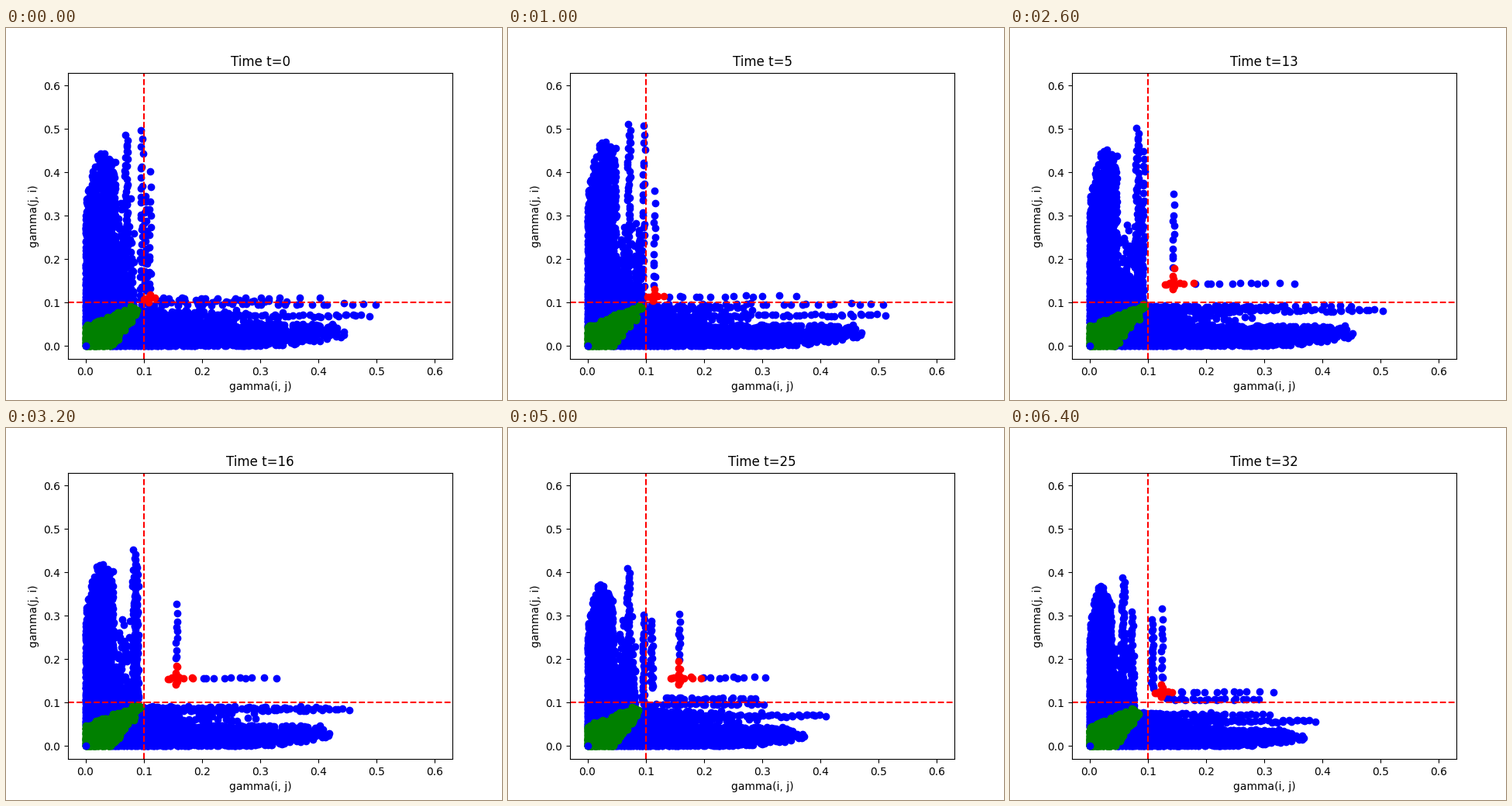
A matplotlib script for the animation above (6600 ms loop, 640x480 px).

```python
import numpy as np
import matplotlib.pyplot as plt
from matplotlib.animation import FuncAnimation

FRAMES, INTERVAL = 33, 200
LIMITS = (-0.03, 0.63)
THRESHOLD = 0.1
rng = np.random.default_rng(7)


def keyed(*keys):
    """Function of time running through (time, value) keys."""
    times, values = zip(*keys)
    return lambda t: np.interp(t, times, values)


class Core:
    """Dense wing of many weak nodes, longest at a mid weak value."""
    reach = staticmethod(keyed((0, 0.462), (5, 0.49), (10, 0.505), (16, 0.436),
                               (20, 0.408), (25, 0.384), (32, 0.38)))
    width = staticmethod(keyed((0, 0.052), (10, 0.047), (20, 0.049), (32, 0.038)))
    peak = staticmethod(keyed((0, 0.034), (16, 0.032), (32, 0.022)))

    def __init__(self, count):
        self.u = rng.beta(1, 1.6, count)
        self.v = rng.random(count) ** 1.2

    def points(self, t):
        b = self.v * self.width(t)
        peak = self.peak(t)
        reach = self.reach(t) * (1 - 0.27 * (b / peak - 1) ** 2)
        return self.u * reach, b


class Bulk:
    """Medium nodes: a solid block along the diagonal and a looser spread."""
    top = staticmethod(keyed((0, 0.083), (10, 0.095), (20, 0.086), (32, 0.077)))
    reach = staticmethod(keyed((0, 0.34), (7, 0.26), (20, 0.32), (32, 0.27)))

    def __init__(self, near, far):
        self.v, self.gap = rng.random(near), rng.exponential(0.022, near)
        self.far_u, self.far_v = rng.beta(1, 1.9, far), rng.random(far)

    def points(self, t):
        top = self.top(t)
        b = self.v * top
        far_a = 0.05 + self.far_u * (self.reach(t) - 0.05)
        far_b = 0.04 + self.far_v * (top - 0.04)
        return np.r_[b + self.gap, far_a], np.r_[b, far_b]


class Row:
    """Strong node: nearly constant weak value, strong values up to a reach."""

    def __init__(self, count, start, power, spread, level, reach):
        self.start, self.level, self.reach = start, level, reach
        self.q = ((np.arange(count) + rng.random(count)) / count) ** power
        self.q[-1] = 1
        self.noise = rng.uniform(-1, 0.5, count) * spread

    def points(self, t):
        level = self.level(t)
        start = self.start * level
        a = start + self.q * (self.reach(t) - start)
        return a, level + self.noise + 0.004 * (a - 0.2)


GROUPS = [
    Core(1700),
    Bulk(450, 170),
    Row(18, 0.9, 1.6, 0.002,
        keyed((0, 0.111), (5, 0.115), (10, 0.132), (16, 0.157), (20, 0.168),
              (25, 0.158), (32, 0.125)),
        keyed((0, 0.402), (5, 0.358), (10, 0.375), (20, 0.297), (32, 0.316))),
    Row(22, 1.2, 1.2, 0.003,
        keyed((0, 0.104), (5, 0.09), (16, 0.09), (20, 0.112), (32, 0.109)),
        keyed((0, 0.345), (5, 0.267), (16, 0.341), (20, 0.287), (32, 0.291))),
    Row(28, 1, 1.2, 0.003,
        keyed((0, 0.096), (10, 0.097), (16, 0.089), (25, 0.097), (32, 0.073)),
        keyed((0, 0.498), (5, 0.508), (10, 0.487), (16, 0.412), (20, 0.297),
              (32, 0.309))),
    Row(55, 0.8, 1, 0.004,
        keyed((0, 0.07), (5, 0.071), (10, 0.08), (16, 0.084), (20, 0.079),
              (32, 0.058)),
        keyed((0, 0.487), (5, 0.511), (6, 0.541), (7, 0.54), (10, 0.515),
              (13, 0.503), (16, 0.453), (20, 0.43), (25, 0.409), (32, 0.388))),
]


def cloud(t):
    """All (strong, weak) pairs at time t, mirrored across the diagonal."""
    a, b = np.concatenate([group.points(t) for group in GROUPS], axis=1)
    return np.r_[np.c_[a, b], np.c_[b, a]]


def split(points):
    """Pairs that are one-sided, weak and balanced, strong and balanced."""
    low, high = points.min(axis=1), points.max(axis=1)
    weak = high < 0.043 + 0.54 * low + ragged
    strong = (low > THRESHOLD) & (high - low < 0.014 + 0.46 * (low - THRESHOLD))
    return points[~(weak | strong)], points[weak & ~strong], points[strong]


ragged = rng.normal(0, 0.003, len(cloud(0)))

fig, ax = plt.subplots(figsize=(6.4, 4.8), dpi=100)
dots = [ax.plot([], [], "o", color=c)[0] for c in ("blue", "green", "red")]
ax.plot(0, 0, "o", color="blue")
ax.axhline(THRESHOLD, color="red", linestyle="--")
ax.axvline(THRESHOLD, color="red", linestyle="--")
ax.set(xlim=LIMITS, ylim=LIMITS, xlabel="gamma(i, j)", ylabel="gamma(j, i)")
title = ax.set_title("Time t=0")


def update(t):
    for line, points in zip(dots, split(cloud(t))):
        line.set_data(points[:, 0], points[:, 1])
    title.set_text(f"Time t={t}")
    return *dots, title


anim = FuncAnimation(fig, update, frames=FRAMES, interval=INTERVAL,
                     repeat=True, repeat_delay=0)
plt.show()
```
